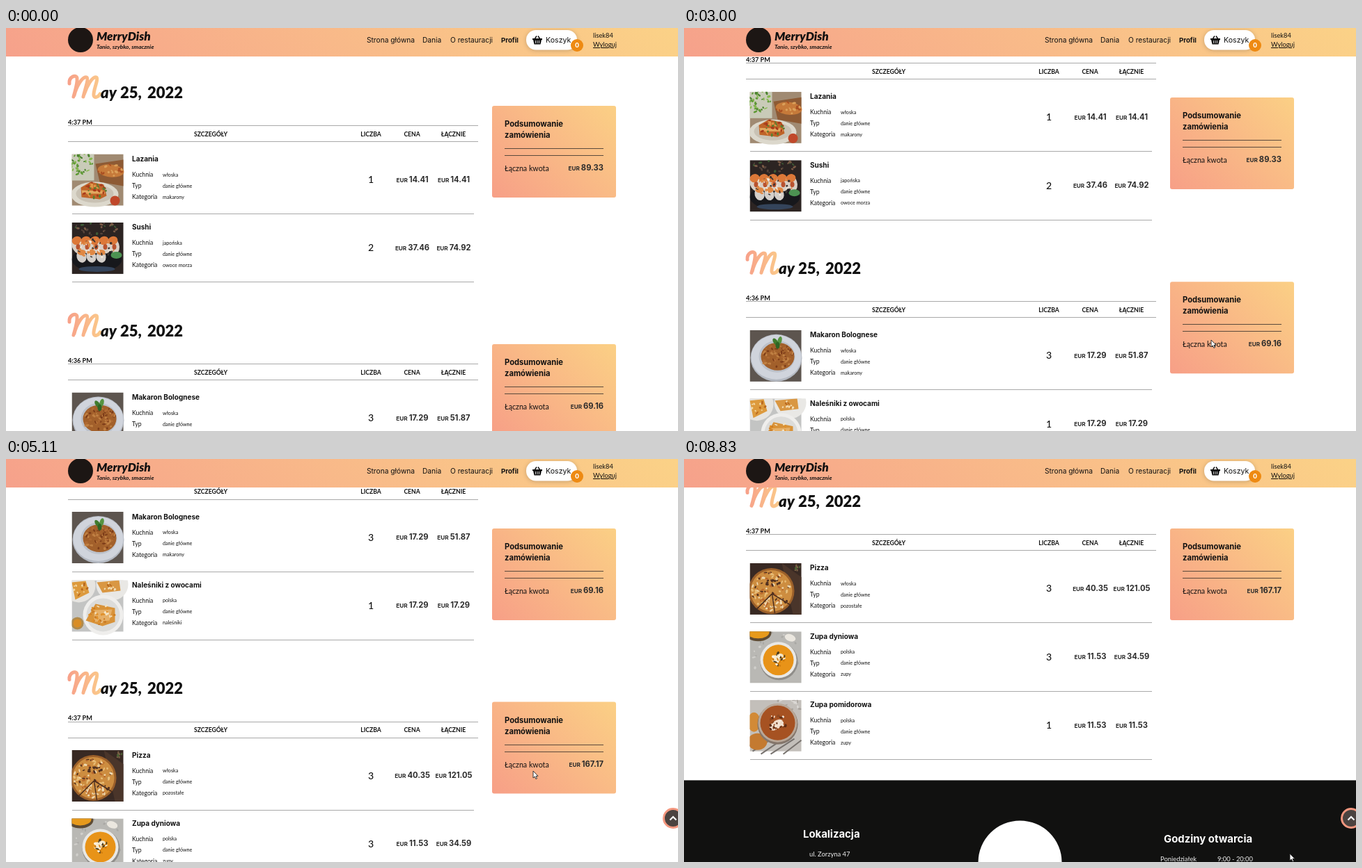
Write an HTML page that moves like this. It is 965 px wide and 580 px high and loops after 9430 ms.

```html
<!DOCTYPE html>
<html lang="pl">
<head>
<meta charset="utf-8">
<title>Historia zamówień</title>
<style>
html, body { margin: 0; width: 100%; height: 100%; overflow: hidden; background: #fff; }
svg { display: block; width: 965px; height: 580px; }
svg svg { width: 74px; height: 74px; }
text { font-family: Lato, sans-serif; fill: #111; white-space: pre; }
.line { shape-rendering: crispEdges; }
.nav { font: 10.2px Inter, sans-serif; }
.bold { font: 700 9.6px Inter, sans-serif; }
.cart { font: 10.6px Inter, sans-serif; }
.badge { font: 700 9px Inter, sans-serif; fill: #fff; }
.brand { font: italic 900 17.2px Lato, sans-serif; }
.slogan { font: italic 700 8.3px Lato, sans-serif; }
.user { font-size: 9.3px; }
.date { font: 900 22px Lato, sans-serif; }
.script { font-style: italic; }
.time { font-size: 9.2px; font-weight: 700; }
.head { font-size: 8.6px; font-weight: 700; }
.dish { font: 700 10px Inter, sans-serif; }
.key { font-size: 8.6px; }
.val { font-size: 7.2px; }
.qty { font-size: 14px; font-weight: 500; }
.price { font: 700 11.2px Inter, sans-serif; fill: #2b2b2b; }
.cur { font-size: 8.2px; }
.sum { font: 700 11.2px Inter, sans-serif; }
.total { font-size: 10.7px; }
.foot { font: 700 14.9px Inter, sans-serif; fill: #fff; }
.info { font-size: 9.4px; fill: #eee; }
</style>
</head>
<body>
<svg id="stage" viewBox="0 0 965 580"></svg>
<script>
const LOOP = 9430, NOTCH = 89.7, PITCH = 343, ROW = 98.4, CARD_TOP = 112, CARD_H = 132, STICKY = 100;

let seed = 7;
const rand = () => (seed = seed * 16807 % 2147483647) / 2147483647;

const text = (x, y, cls, s, anchor = 'start') =>
  `<text x="${x}" y="${y}" class="${cls}" text-anchor="${anchor}">${s}</text>`;
const hline = (x1, x2, y, color = '#a9a9a9') =>
  `<path class="line" d="M${x1} ${y}H${x2}" stroke="${color}"/>`;
const rect = (x, y, w, h, fill, more = '') =>
  `<rect x="${x}" y="${y}" width="${w}" height="${h}" fill="${fill}" ${more}/>`;
const oval = (x, y, rx, ry, fill, turn = 0) =>
  `<ellipse cx="${x}" cy="${y}" rx="${rx}" ry="${ry}" fill="${fill}" transform="rotate(${turn} ${x} ${y})"/>`;
const disc = (x, y, r, fill) => oval(x, y, r, r, fill);
const poly = (d, fill) => `<path d="${d}" fill="${fill}"/>`;
const bits = (x, y, rx, ry, n, ...colors) => {
  let out = '';
  for (let i = 0; i < n; i++) {
    const a = rand() * 6.283, d = Math.sqrt(rand());
    out += oval(x + rx * d * Math.cos(a), y + ry * d * Math.sin(a),
      1 + rand() * 2, .8 + rand(), colors[i % colors.length], rand() * 180);
  }
  return out;
};
const price = (x, y, n, anchor) =>
  text(x, y, 'price', `<tspan class="cur">EUR </tspan>${n.toFixed(2)}`, anchor);

const photos = {
  lasagne: () => rect(0, 0, 74, 74, '#a08a72') + rect(0, 0, 32, 38, '#c9cbb8') +
    bits(14, 14, 16, 16, 40, '#5f9a35', '#86b94f', '#4d8430') +
    poly('M34 14L74 8V46L40 40Z', '#8d5a34') + oval(56, 24, 19, 9, '#c67a3a', 6) +
    bits(56, 24, 18, 9, 18, '#dba05a', '#a94f22') +
    oval(33, 58, 34, 18, '#dcd8cc') + oval(33, 57, 27, 13, '#c9c2b4') +
    poly('M13 48L27 40L46 44L50 60L40 65L14 62Z', '#bf6429') + poly('M14 52L46 53L48 57L15 57Z', '#e2a860') +
    bits(32, 52, 17, 11, 36, '#a83a1b', '#e09a49', '#56802f') + disc(62, 67, 7, '#c0482a'),
  sushi: () => rect(0, 0, 74, 74, '#2c2422') + bits(37, 9, 36, 9, 26, '#55433a', '#7a5a46', '#3d5a35') +
    oval(36, 53, 36, 18, '#17181c') +
    [8, 21, 34, 47, 60].map(x => oval(x, 33, 8, 12, '#d9cfc5', -18) + oval(x - 1, 26, 7, 6, '#dc7838', -18) +
      oval(x + 1, 35, 3, 4, '#b9532f')).join('') +
    [14, 28, 42].map(x => oval(x, 49, 7, 9, '#d4cfca', -15) + oval(x, 43, 6, 4, '#e08844')).join('') +
    bits(32, 38, 31, 14, 44, '#f0e6d8', '#dd8844', '#3b3431') + oval(64, 47, 8, 5, '#4c9252') +
    oval(36, 67, 26, 4, '#34445b'),
  pasta: () => rect(0, 0, 74, 74, '#5d554f') + oval(38, 40, 37, 34, '#b4b9c2') + oval(38, 39, 36, 32, '#d0d4dc') +
    oval(39, 38, 26, 23, '#bcc1ca') + oval(40, 38, 24, 20, '#a2602b') +
    bits(40, 38, 23, 19, 70, '#c08043', '#7d3c19', '#b06a33') +
    oval(37, 17, 3, 6, '#3f7b2d', -35) + oval(43, 15, 3, 6, '#569340', 15) + oval(40, 22, 3, 5, '#2f6424'),
  crepes: () => rect(0, 0, 74, 74, '#c3c4c3') + disc(10, 8, 24, '#e6e4e0') + disc(58, 6, 23, '#e9e8e5') +
    disc(45, 50, 29, '#efeeec') + disc(45, 50, 24, '#dcdcda') +
    poly('M0 3L20 1L25 18L5 28Z', '#dd9a3d') + poly('M36 3L68 0L70 15L44 18Z', '#d99743') +
    poly('M20 58L34 34L62 40L62 60L44 66Z', '#d8933a') + poly('M32 43L58 42L54 58L32 60Z', '#e6b068') +
    bits(43, 50, 18, 14, 36, '#f4e2c0', '#c97a24', '#e0902a') + bits(12, 13, 11, 9, 12, '#f3d8a5', '#b9691f') +
    bits(56, 9, 12, 6, 12, '#f3dcb0', '#b9691f') + disc(8, 62, 9, '#b08a4c') + disc(8, 62, 6, '#d98d26'),
  pizza: () => rect(0, 0, 74, 74, '#382923') + poly('M46 0L74 20V74H62Z', '#4a352a') +
    disc(31, 40, 33, '#9c602a') + disc(31, 40, 30, '#cd8d40') +
    bits(31, 40, 28, 28, 110, '#e8bd77', '#51301f', '#bb6a2d', '#eed8b0') +
    '<path d="M32 44L10 66M32 44L36 72M32 44L58 60" stroke="#4b2c1c" stroke-width="1.5"/>' +
    bits(66, 8, 6, 7, 8, '#7a5f45', '#4d6535'),
  pumpkin: () => rect(0, 0, 74, 74, '#b9b8b4') + bits(37, 37, 36, 36, 30, '#d0cfcb', '#a9a8a4') +
    oval(12, 2, 19, 12, '#5d4b34') + oval(12, 1, 16, 9, '#e79a1c') + oval(58, 9, 8, 5, '#ebe7df', 20) +
    disc(42, 43, 27, '#8f8d89') + disc(41, 41, 26, '#e9e8e5') + disc(41, 41, 22, '#e89318') +
    oval(40, 38, 9, 5, '#f5e7c9', -30) + bits(41, 40, 10, 10, 24, '#fff2dc', '#4a3c22', '#d17d0d'),
  tomato: () => rect(0, 0, 74, 74, '#c3bfba') +
    '<path d="M4 74L44 48M16 78L54 52M30 78L64 56M48 78L74 58M0 66L30 46" stroke="#77726e" stroke-width="2"/>' +
    bits(50, 8, 26, 9, 18, '#dbd8d4', '#a8a39d') + oval(6, 32, 9, 14, '#d28a36') + oval(11, 60, 14, 12, '#c47a30') +
    disc(40, 35, 29, '#84766b') + disc(40, 33, 28, '#b9a797') + disc(40, 33, 25, '#a65222') +
    oval(38, 36, 11, 6, '#f0dcc8', -35) + bits(40, 33, 14, 13, 30, '#f5e9da', '#5f2d14', '#8f4a22')
};

const orders = [
  { time: '4:37 PM', sum: 89.33, rows: [
    ['Lazania', 'włoska', 'makarony', 1, 14.41, 'lasagne'],
    ['Sushi', 'japońska', 'owoce morza', 2, 37.46, 'sushi']] },
  { time: '4:36 PM', sum: 69.16, rows: [
    ['Makaron Bolognese', 'włoska', 'makarony', 3, 17.29, 'pasta'],
    ['Naleśniki z owocami', 'polska', 'naleśniki', 1, 17.29, 'crepes']] },
  { time: '4:37 PM', sum: 167.17, rows: [
    ['Pizza', 'włoska', 'pozostałe', 3, 40.35, 'pizza'],
    ['Zupa dyniowa', 'polska', 'zupy', 3, 11.53, 'pumpkin'],
    ['Zupa pomidorowa', 'polska', 'zupy', 1, 11.53, 'tomato']] }
];

const row = ([name, kitchen, kind, qty, cost, photo], i) =>
  `<g transform="translate(0 ${i * ROW})">
  <svg x="94.5" y="181.5">${photos[photo]()}</svg>` +
  text(181, 192, 'dish', name) +
  [['Kuchnia', kitchen], ['Typ', 'danie główne'], ['Kategoria', kind]].map(([k, v], j) =>
    text(181, 214 + 16 * j, 'key', k) + text(225, 213.5 + 16 * j, 'val', v)).join('') +
  text(524, 223, 'qty', qty, 'middle') + price(583.5, 221.5, cost, 'middle') +
  price(643, 221.5, cost * qty, 'middle') + hline(95, 672, 267.5) + '</g>';

const order = ({ time, rows }, i) =>
  `<g transform="translate(0 ${i * PITCH})">
  <path d="M91 80C90 70 101 66 102 72C103 80 99 91 97 99M98 97C101 84 110 69 116 71C119 73 113 90 111 99
    M112 96C116 84 124 69 130 71C133 74 125 90 126 97C127 101 132 100 135 95"
    fill="none" stroke="url(#ink)" stroke-width="5" stroke-linecap="round" stroke-linejoin="round"/>` +
  text(136, 100.5, 'date script', 'ay') + text(164, 100.5, 'date', '25,') + text(203, 100.5, 'date', '2022') +
  text(89, 138.5, 'time', time) + hline(89, 678, 140.5) +
  [[294, 'SZCZEGÓŁY'], [524, 'LICZBA'], [583, 'CENA'], [642.5, 'ŁĄCZNIE']].map(([x, s]) =>
    text(x, 155.5, 'head', s, 'middle')).join('') +
  hline(89, 678, 163.5) + rows.map(row).join('') + '</g>';

const card = ({ sum }) => '<g class="card">' + rect(698, 0, 178, CARD_H, 'url(#warm)', 'rx="3"') +
  text(716, 30, 'sum', 'Podsumowanie') + text(716, 46, 'sum', 'zamówienia') +
  hline(716, 858, 61.5, '#5a4a3c') + hline(716, 858, 71.5, '#5a4a3c') +
  text(716, 94, 'total', 'Łączna kwota') + price(858, 93, sum, 'end') + '</g>';

const footer = rect(0, 1180, 965, 400, '#111110') + text(171, 1263, 'foot', 'Lokalizacja') +
  text(180, 1290, 'info', 'ul. Zorzyna 47') + disc(482.5, 1298, 60, '#fff') +
  text(689, 1270, 'foot', 'Godziny otwarcia') + text(684, 1297, 'info', 'Poniedziałek') +
  text(817, 1297, 'info', '9:00 - 20:00', 'end');

const header = rect(0, 0, 965, 41, 'url(#bar)') + disc(107, 17, 18, '#1c1614') +
  text(130, 18, 'brand', 'MerryDish') + text(130, 29.5, 'slogan', 'Tanio, szybko, smacznie') +
  text(518, 21, 'nav', 'Strona główna') + text(598, 21, 'nav', 'Dania') +
  text(638, 21, 'nav', 'O restauracji') + text(711, 21, 'bold', 'Profil') +
  rect(747, 3, 73, 28.5, '#fff', 'rx="14" style="filter:drop-shadow(0 1px 3px #0003)"') +
  '<path d="M759 16L762 11.5M767 16L764 11.5" stroke="#111" stroke-width="1.5"/>' +
  poly('M756 15h14v2h-1l-1.5 6.5h-9L757 17h-1z', '#111') +
  '<path d="M760.5 18v4M763 18v4M765.5 18v4" stroke="#fff" stroke-width=".8"/>' +
  text(775, 21, 'cart', 'Koszyk') + disc(820, 25, 9, '#ee8a12') + text(820, 28.3, 'badge', '0', 'middle') +
  text(843, 13.5, 'user', 'lisek84') +
  '<g text-decoration="underline">' + text(843, 27, 'user', 'Wyloguj') + '</g>';

// Diagonal 45 degree gradient that just covers the box
const diagonal = (id, x, w, h, from, to) => {
  const r = (w + h) / 4, cx = x + w / 2, cy = h / 2;
  return `<linearGradient id="${id}" gradientUnits="userSpaceOnUse" x1="${cx - r}" y1="${cy + r}" x2="${cx + r}" y2="${cy - r}">
    <stop stop-color="${from}"/><stop offset="1" stop-color="${to}"/></linearGradient>`;
};

const stage = document.getElementById('stage');
stage.innerHTML = `<defs>
  ${diagonal('bar', 0, 965, 41, '#f6a18b', '#fbd287')}
  ${diagonal('warm', 698, 178, CARD_H, '#f79f87', '#fbd085')}
  <linearGradient id="ink" gradientUnits="userSpaceOnUse" x1="89" y1="0" x2="136" y2="0"><stop stop-color="#f7a089"/><stop offset="1" stop-color="#fbc98a"/></linearGradient>
  </defs>
  <g id="page">${orders.map(order).join('')}${footer}</g>
  ${orders.map(card).join('')}${header}
  <g id="up"><circle cx="958" cy="517" r="13.5" fill="#4b4340" stroke="#f4977f" stroke-width="3"/>
  <path d="M953.5 519.5l4.5-4.5 4.5 4.5" fill="none" stroke="#fff" stroke-width="2.2"/></g>
  <path id="cursor" d="M0 0V10L2.3 8L3.9 11.5L5.5 10.8L4 7.3H7Z" fill="#fff" stroke="#222" stroke-width=".9"/>`;

const page = document.getElementById('page'), up = document.getElementById('up');
const cursor = document.getElementById('cursor'), cards = [...document.querySelectorAll('.card')];
const move = (el, x, y) => el.setAttribute('transform', `translate(${x} ${y})`);

const scrolls = [3000, 3600, 3890, 4000, 5110, 5700, 6300, 8410];
// Pointer legs: start, end, steps, from, to
const legs = [
  [390, 1290, 10, [966, 330], [800, 400]],
  [1390, 1580, 3, [800, 400], [775, 430]],
  [1880, 2080, 3, [775, 430], [757, 449]],
  [8410, 8830, 5, [757, 449], [870, 568]]
];
const stepped = (t, from, to, n) =>
  Math.min(n, Math.max(0, Math.floor((t - from) / (to - from) * (n - 1) + 1.001))) / n;

function draw(t) {
  const scroll = scrolls.filter(s => t >= s).length * NOTCH;
  move(page, 0, -scroll);
  cards.forEach((c, i) => {
    const top = i * PITCH + CARD_TOP - scroll;
    const last = i * PITCH + 273.5 + ROW * (orders[i].rows.length - 1) - scroll - CARD_H;
    move(c, 0, Math.max(top, Math.min(STICKY, last)));
  });

  const shown = stepped(t, 4000, 4410, 5);
  move(up, shown ? 14 * ((1 - shown) / .8) ** 2 : 30, 0);

  const leg = legs.filter(l => t >= l[0]).pop();
  cursor.style.display = leg ? '' : 'none';
  if (leg) {
    const [from, to, n, a, b] = leg, k = stepped(t, from, to, n);
    move(cursor, a[0] + (b[0] - a[0]) * k, a[1] + (b[1] - a[1]) * k);
  }
}

const begin = performance.now();
function tick() {
  draw((performance.now() - begin) % LOOP);
  requestAnimationFrame(tick);
}
tick();
</script>
</body>
</html>
```
